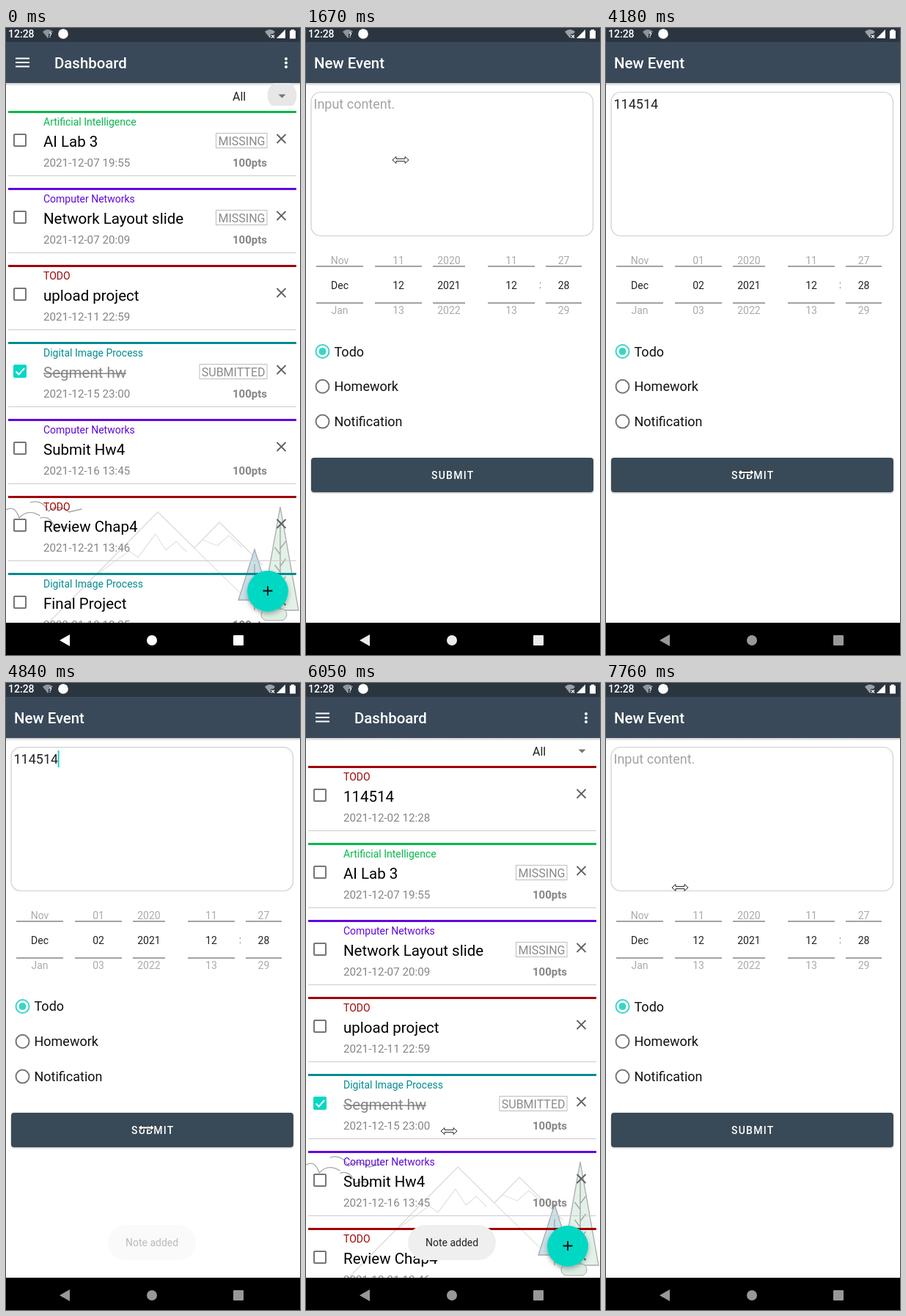
These frames come from a looping animation (401 by 855 pixels, 8 s). An HTML page:

```html
<!DOCTYPE html>
<html lang="en">
<head>
<meta charset="utf-8">
<title>Planner</title>
<style>
  html, body { margin: 0; width: 100%; height: 100%; overflow: hidden; background: #000; }
  svg { display: block; width: 100%; height: 100%; }
  text { font-family: Roboto, "Noto Sans", sans-serif; white-space: pre; }
  .m { font-weight: 500; }
  .line { fill: none; stroke-linecap: round; stroke-linejoin: round; }
</style>
</head>
<body>
<svg id="stage" viewBox="0 0 401 855"></svg>
<script>
const LOOP = 8000;
const TEAL = '#03d8c4', HEADER = '#394959', STATUS = '#2b3540';

// ---------- markup helpers ----------
const text = (x, y, size, fill, str, extra = '') =>
  `<text x="${x}" y="${y}" font-size="${size}" fill="${fill}" ${extra}>${str}</text>`;
const rect = (x, y, w, h, fill, extra = '') =>
  `<rect x="${x}" y="${y}" width="${w}" height="${h}" fill="${fill}" ${extra}/>`;
const circle = (x, y, r, fill, extra = '') =>
  `<circle cx="${x}" cy="${y}" r="${r}" fill="${fill}" ${extra}/>`;
const line = (d, color, width = 2, extra = '') =>
  `<path d="${d}" fill="none" stroke="${color}" stroke-width="${width}" ${extra}/>`;

const chrome = rect(-5, -5, 411, 24, STATUS) + rect(-5, 19, 411, 56, HEADER) +
  rect(-5, 75, 411, 4, 'url(#fade)');
const navBack = rect(-5, 811, 411, 49, '#000');

// ---------- dashboard ----------
const COURSES = {
  ai: ['Artificial Intelligence', '#08b84c'],
  net: ['Computer Networks', '#5f08e0'],
  todo: ['TODO', '#a00404'],
  img: ['Digital Image Process', '#048b92']
};
const NOTES = [
  { course: 'todo', title: '114514', date: '2021-12-02 12:28' },
  { course: 'ai', title: 'AI Lab 3', date: '2021-12-07 19:55', tag: 'MISSING', points: true },
  { course: 'net', title: 'Network Layout slide', date: '2021-12-07 20:09', tag: 'MISSING', points: true },
  { course: 'todo', title: 'upload project', date: '2021-12-11 22:59' },
  { course: 'img', title: 'Segment hw', date: '2021-12-15 23:00', tag: 'SUBMITTED', points: true, done: true },
  { course: 'net', title: 'Submit Hw4', date: '2021-12-16 13:45', points: true },
  { course: 'todo', title: 'Review Chap4', date: '2021-12-21 13:46' },
  { course: 'img', title: 'Final Project', date: '2022-01-10 10:25', points: true }
];

function noteRow(note, i) {
  const [course, color] = COURSES[note.course];
  const tagX = note.tag === 'MISSING' ? 286.5 : 264;
  const box = note.done
    ? rect(10, 144, 18, 18, TEAL, 'rx="2"') + line('M13.5 153.5 L17.5 157.5 L25 149', '#fff')
    : rect(11, 145, 16, 16, 'none', 'rx="1" stroke="#757575" stroke-width="2"');
  return `<g transform="translate(0 ${i * 105})">` +
    rect(3, 113, 393, 3, color) + rect(3, 201, 393, 1, '#ccc') +
    text(51, 133, 14, color, course) + box +
    text(51, 162, 20.5, note.done ? '#888' : '#000', note.title) +
    (note.done ? rect(51, 155.5, 113, 1.3, '#777') : '') +
    text(51, 188.5, 15.2, '#858585', note.date) +
    (note.tag ? rect(tagX, 143.5, 356 - tagX, 20, 'none', 'stroke="#bdbdbd"') +
      text(353.5, 159.5, 16, '#8a8a8a', note.tag, 'text-anchor="end"') : '') +
    (note.points ? text(356, 188.5, 15, '#858585', '100pts', 'text-anchor="end" font-weight="700"') : '') +
    line('M369.5 145 l12 12 m0 -12 l-12 12', '#606060', 1.8) + '</g>';
}

function tree(x, top, base, half, fill) {
  let twigs = `M${x} ${top + 20} V${base + 14}`;
  for (let y = top + 45; y < base; y += 24)
    twigs += ` M${x} ${y + 12} l${half * .3} -10 M${x} ${y + 20} l${-half * .3} -10`;
  return `<path d="M${x} ${top} L${x + half} ${base} H${x - half} Z" fill="${fill}" stroke="#aaa" stroke-width="1.3"/>` +
    line(twigs, '#a4a4a4', 1.3);
}

const scenery = '<g class="line">' +
  line('M58 811 L207 660 L257 709 L291 674 L350 732', '#dedede', 1.5) +
  line('M120 748 L168 713 L180 722 L204 690 L218 712 L232 700 L246 714 M268 698 L288 706 L304 692 L322 708 M207 660 L278 730 L350 800', '#e4e4e4', 1.3) +
  line('M0 657 Q12 650 18 668 Q30 655 46 665 M33 647 Q49 642 58 659 Q70 648 86 660 L103 656 M47 668 Q61 664 67 683 Q77 677 89 684', '#a6a6a6', 1.3) +
  '</g>' +
  tree(374, 653, 794, 25, '#e2f2e8') + tree(339, 711, 780, 22, '#c9e0e8') +
  rect(348, 792, 35, 16, '#dceee2', 'rx="8" stroke="#aaa"');

const listOf = notes => notes.slice(0, 7).map(noteRow).join('');

const dashboard = rect(-5, -5, 411, 865, '#fff') + scenery +
  `<g id="listBefore">${listOf(NOTES.slice(1))}</g><g id="listAfter">${listOf(NOTES)}</g>` +
  chrome +
  line('M13 41.5 h19 m-19 5.5 h19 m-19 5.5 h19', '#fff') +
  text(66, 55, 20.4, '#fff', 'Dashboard', 'class="m"') +
  [42, 47.5, 53].map(y => circle(382, y, 2, '#fff')).join('') +
  `<g clip-path="url(#spinnerClip)">${circle(376.5, 92, 20, '#e7e7e7', 'id="spinnerRipple"')}</g>` +
  text(309, 98.5, 16, '#222', 'All') + '<path d="M371.5 90.5 h10 l-5 5z" fill="#757575"/>' +
  circle(357, 768, 28, TEAL, 'filter="url(#shadow)"') +
  circle(357, 768, 0, '#000', 'id="fabRipple" opacity=".14"') +
  line('M350.5 767.5 h13 m-6.5 -6.5 v13', '#111') +
  navBack;

// ---------- new event form ----------
const WHEELS = [
  [14, 78, ['Nov', 'Dec', 'Jan']], [94, 158, null], [173, 217, ['2020', '2021', '2022']],
  [248, 312, ['11', '12', '13']], [327, 376, ['27', '28', '29']]
];
const wheelText = (x, offset, str) =>
  text(x, 356 + offset * 34, 14, '#222', str,
    `text-anchor="middle" opacity="${1 - .62 * Math.min(1, Math.abs(offset))}"`);

const wheels = WHEELS.map(([a, b, items]) =>
  rect(a, 324, b - a, 2, '#a3a3a3') + rect(a, 374, b - a, 2, '#a3a3a3') +
  (items ? items.map((s, i) => wheelText((a + b) / 2, i - 1, s)).join('') : '')).join('') +
  text(319.5, 355, 14, '#777', ':', 'text-anchor="middle"');

const radios = ['Todo', 'Homework', 'Notification'].map((label, i) => {
  const y = 441 + i * 47.8;
  return circle(22.5, y, 9, 'none', `stroke="${i ? '#757575' : '#3ad5c5'}" stroke-width="2"`) +
    (i ? '' : circle(22.5, y, 5, '#3ad5c5')) + text(38.5, y + 6.5, 18, '#111', label);
}).join('');

const form = rect(-5, -5, 411, 865, '#fff') + chrome +
  text(11, 55, 20.4, '#fff', 'New Event', 'class="m"') +
  rect(7, 87.5, 384.5, 196, '#fff', 'rx="13" stroke="#cfcfcf" stroke-width="1.2"') +
  text(10.5, 110, 18, '#a3a3a3', 'Input content.', 'id="hint"') +
  text(10.5, 110, 18, '#222', '', 'id="entry"') + rect(10, 92, 2, 23, '#26d3c1', 'id="caret"') +
  `<g clip-path="url(#wheelClip)">${wheels}<g id="days"></g></g>` + radios +
  rect(7, 586, 385, 47, HEADER, 'rx="4" filter="url(#shadowSmall)"') +
  `<g clip-path="url(#submitClip)">${circle(191, 606, 0, '#fff', 'id="submitRipple"')}</g>` +
  text(171, 615, 14, '#fff', 'SUBMIT', 'class="m" letter-spacing="1.25"') +
  navBack;

// ---------- system layer ----------
const wifi = (x, fill, mark) =>
  `<path d="M${x} 14 L${x - 7} 5 Q${x} -1 ${x + 7} 5 Z" fill="${fill}"/>` + mark;
const system =
  text(3, 13, 14, '#fff', '12:28', 'class="m"') +
  wifi(57, '#8f959b', rect(58, 6, 6, 8, STATUS) + text(58, 13, 9, '#fff', '?', 'font-weight="700"')) +
  circle(78, 8, 6.8, '#fff') +
  wifi(360, '#9ba0a5', rect(361, 8, 6, 6, STATUS) + line('M362 9.5 l4 4 m0 -4 l-4 4', '#fff', 1.2)) +
  '<path d="M369 14 L381 2 V14 Z" fill="#fff"/>' +
  '<path d="M387 3.5 h2 v-1.5 h4 v1.5 h2 v11 h-8 z" fill="#fff"/>' +
  `<g id="nav"><path d="M73 835 L87 827 V843 Z"/>${circle(199, 835, 7, 'inherit')}<rect x="310" y="828" width="14" height="14" rx="1"/></g>`;

const clip = (id, ...box) => `<clipPath id="${id}">${rect(...box, '#000')}</clipPath>`;
const shadow = (id, dy, blur) => `<filter id="${id}" x="-30%" y="-30%" width="160%" height="170%">
  <feDropShadow dx="0" dy="${dy}" stdDeviation="${blur}" flood-opacity=".3"/></filter>`;

const stage = document.getElementById('stage');
stage.innerHTML = `<defs>
  <linearGradient id="fade" x2="0" y2="1"><stop stop-opacity=".2"/><stop offset="1" stop-opacity="0"/></linearGradient>
  ${clip('spinnerClip', 350, 75, 55, 31)}${clip('wheelClip', 0, 309, 401, 82)}${clip('submitClip', 7, 586, 385, 47)}
  ${shadow('shadow', 3, 3)}${shadow('shadowSmall', 1, 1)}</defs>
  <g id="dash">${dashboard}</g><g id="form">${form}</g>
  <g id="toast">${rect(139, 739, 120, 48, '#efefef', 'rx="24"')}${text(163, 768, 14, '#222', 'Note added')}</g>
  ${system}
  <path id="pointer" d="M-11 0 L-6 -4.5 V-1.6 H6 V-4.5 L11 0 L6 4.5 V1.6 H-6 V4.5 Z" fill="#fff" stroke="#222" stroke-width="1"/>`;

// ---------- motion ----------
const OPEN_TIMES = [812, 6940], CLOSE_TIME = 4836;
const KEY_TIMES = [1760, 1910, 2040, 2230, 2350, 2590];
const POINTER = [
  [80, 376, 120], [600, 357, 769], [930, 357, 769], [1270, 129, 180], [1760, 129, 180],
  [2590, 104, 296], [2700, 103, 352], [3080, 168, 574], [3850, 168, 574], [4140, 191, 606],
  [4800, 191, 606], [5000, 194, 610], [5200, 195, 611], [6060, 195, 611], [6650, 353, 771],
  [7180, 353, 771], [7550, 110, 268], [7760, 101, 279], [LOOP, 101, 279]
];
const POINTER_SHOWN = [[80, 1760], [2590, 7550], [7760, LOOP]];

const el = id => document.getElementById(id);
const set = (id, attrs) => { for (const k in attrs) el(id).setAttribute(k, attrs[k]); };
const ramp = (t, a, b) => Math.min(1, Math.max(0, (t - a) / (b - a)));
const smooth = p => p * p * (3 - 2 * p);
const mix = (a, b, p) => a + (b - a) * p;
const within = (t, a, b) => t >= a && t < b;

const cubic = (a, b, c, d, u) => {
  const v = 1 - u;
  return a * v * v * v + 3 * b * u * v * v + 3 * c * u * u * v + d * u * u * u;
};
// Fast start with a very long settle, in two joined curves.
function windowEase(p) {
  const [xs, ys] = p < 1 / 6
    ? [[0, .05, .1333, 1 / 6], [0, 0, .06, .4]]
    : [[1 / 6, .2083, .25, 1], [.4, .82, 1, 1]];
  let lo = 0, hi = 1;
  for (let i = 0; i < 24; i++) {
    const mid = (lo + hi) / 2;
    if (cubic(...xs, mid) < p) lo = mid; else hi = mid;
  }
  return cubic(...ys, lo);
}

function pointerAt(t) {
  const i = Math.max(1, POINTER.findIndex(k => k[0] > t));
  const [t0, x0, y0] = POINTER[i - 1], [t1, x1, y1] = POINTER[i];
  const p = smooth(ramp(t, t0, t1));
  return [mix(x0, x1, p), mix(y0, y1, p)];
}

function dayAt(t) {
  if (t < 2700 || t >= CLOSE_TIME + 400) return 12;
  const dragged = 12 - (pointerAt(Math.min(t, 3080))[1] - 352) / 34;
  return mix(dragged, 2, 1 - (1 - ramp(t, 3080, 3780)) ** 3);
}

function caretOn(t) {
  if (t < 1760) return within(t, 870, 1290);
  if (t < 2590) return true;
  if (t < CLOSE_TIME + 400) return Math.floor((t - 2590) / 500) % 2 === 0 || t > 4590;
  return t < 7510;
}

function placeWindow(id, scale, opacity) {
  set(id, {
    transform: `translate(200.5 427.5) scale(${scale}) translate(-200.5 -427.5)`,
    opacity, visibility: opacity > 0 ? 'visible' : 'hidden'
  });
}

function drawWindows(t) {
  if (within(t, CLOSE_TIME, OPEN_TIMES[1])) {
    const p = windowEase(ramp(t, CLOSE_TIME, CLOSE_TIME + 400));
    placeWindow('dash', mix(1.1, 1, p), 1);
    placeWindow('form', mix(1, .9, p), 1 - ramp(t, CLOSE_TIME + 35, CLOSE_TIME + 85));
  } else {
    const start = t < CLOSE_TIME ? OPEN_TIMES[0] : OPEN_TIMES[1];
    const p = windowEase(ramp(t, start, start + 400));
    placeWindow('dash', mix(1, 1.05, p), 1);
    placeWindow('form', mix(.85, 1, p), ramp(t, start + 50, start + 133));
  }
}

function drawForm(t) {
  const typed = t < CLOSE_TIME + 400 ? KEY_TIMES.filter(k => t >= k).length : 0;
  el('entry').textContent = '114514'.slice(0, typed);
  set('hint', { opacity: typed ? 0 : 1 });
  set('caret', { x: 10 + typed * 10.1, opacity: caretOn(t) ? 1 : 0 });

  const day = dayAt(t), near = Math.round(day);
  el('days').innerHTML = [-2, -1, 0, 1, 2].map(k =>
    wheelText(126, near + k - day, String(Math.max(1, near + k)).padStart(2, '0'))).join('');
  set('submitRipple', {
    r: 330 * smooth(ramp(t, 4260, 4620)),
    opacity: t < 4260 ? 0 : .2 * (1 - ramp(t, 4500, 4820))
  });
}

function draw(t) {
  drawWindows(t);
  drawForm(t);
  const added = t >= 4400;
  set('listBefore', { visibility: added ? 'hidden' : 'inherit' });
  set('listAfter', { visibility: added ? 'inherit' : 'hidden' });
  set('spinnerRipple', { opacity: 1 - ramp(t, 80, 320) });

  const press = t < 4000 ? 700 : 6780;
  set('fabRipple', {
    r: 28 * smooth(ramp(t, press, press + 200)),
    opacity: .14 * (1 - ramp(t, press + 220, press + 450))
  });
  set('toast', { opacity: ramp(t, 4780, 4980) * (1 - ramp(t, 6560, 6840)) });

  const tone = Math.round(mix(255, 152, smooth(ramp(t, 1400, 2350))));
  set('nav', { fill: `rgb(${tone},${tone},${tone})` });

  const [x, y] = pointerAt(t);
  set('pointer', {
    transform: `translate(${x} ${y})`,
    opacity: POINTER_SHOWN.some(([a, b]) => within(t, a, b)) ? 1 : 0
  });
}

const began = performance.now();
function tick() {
  draw((performance.now() - began) % LOOP);
  requestAnimationFrame(tick);
}
tick();
</script>
</body>
</html>
```
